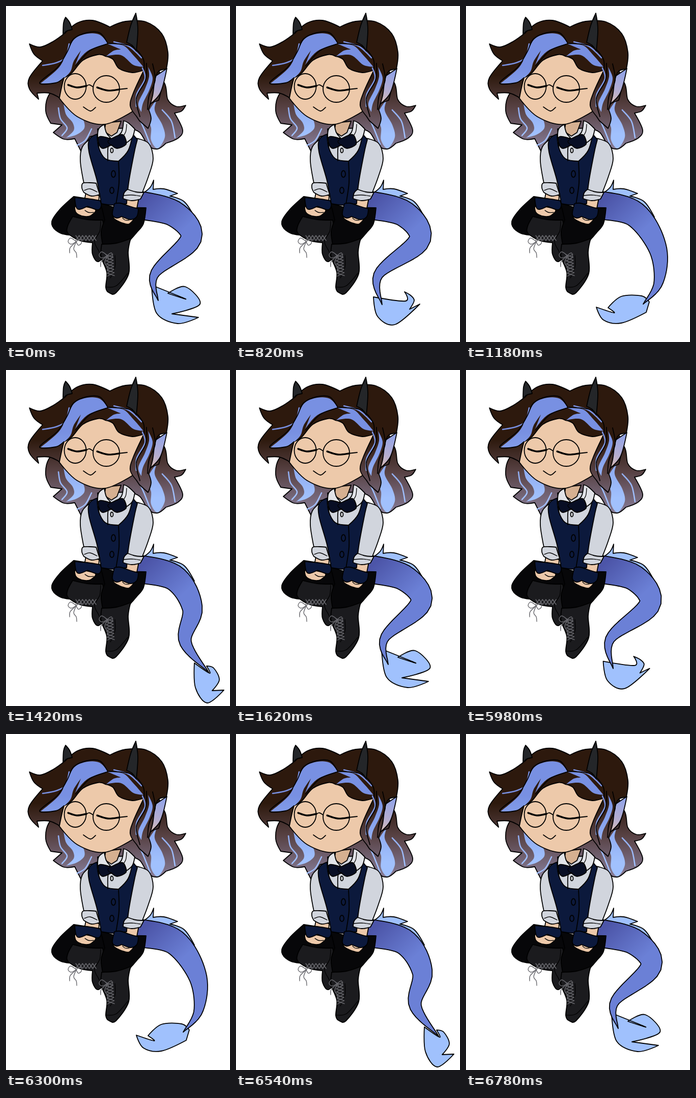
These frames come from a looping animation (440 px wide and 656 px high, 8000 ms). An HTML page:

```html
<!DOCTYPE html>
<html lang="en">
<head>
<meta charset="utf-8">
<title>Resting, with a tail flick</title>
<style>
html, body { margin: 0; width: 100%; height: 100%; overflow: hidden; background: #fff; }
svg { display: block; width: 100vw; height: 100vh; }
path { stroke: #000; stroke-width: 1.8; stroke-linejoin: round; stroke-linecap: round; }
.hair { fill: url(#hairFill); }
.streak { fill: url(#streakFill); stroke: none; }
.ear { fill: url(#earFill); }
.tail { fill: url(#tailFill); }
.fin { fill: #a0c1fd; }
.skin { fill: #edc9aa; }
.neck { fill: #d5b091; }
.shirt { fill: #d1d5dd; }
.collar { fill: #e1e3e7; }
.vest { fill: #0c193c; }
.bow { fill: #080e24; }
.pants { fill: #070709; }
.boot { fill: #1b1b1e; }
.horn { fill: #242629; }
.line, .thin, .lid, .strand, .seam, .lace { fill: none; }
.thin { stroke-width: 1.3; }
.lid { stroke-width: 3.4; }
.strand { stroke: url(#streakFill); stroke-width: 2.6; }
.seam { stroke: #000; stroke-width: 1.2; }
.lace { stroke: #68686d; stroke-width: 1.4; }
</style>
</head>
<body>
<svg id="stage" viewBox="0 0 440 656">
  <defs>
    <linearGradient id="hairFill" gradientUnits="userSpaceOnUse" x1="0" y1="135" x2="0" y2="275">
      <stop offset="0" stop-color="#2d190d"/><stop offset=".45" stop-color="#574143"/><stop offset="1" stop-color="#857a94"/>
    </linearGradient>
    <linearGradient id="streakFill" gradientUnits="userSpaceOnUse" x1="0" y1="120" x2="0" y2="250">
      <stop offset="0" stop-color="#7890e2"/><stop offset="1" stop-color="#a1c1fd"/>
    </linearGradient>
    <linearGradient id="tailFill" gradientUnits="userSpaceOnUse" x1="280" y1="370" x2="345" y2="440">
      <stop offset="0" stop-color="#4c55a8"/><stop offset="1" stop-color="#6b80d6"/>
    </linearGradient>
    <linearGradient id="earFill" gradientUnits="userSpaceOnUse" x1="314" y1="125" x2="284" y2="192">
      <stop offset="0" stop-color="#8fa3ea"/><stop offset=".6" stop-color="#b4add0"/><stop offset="1" stop-color="#dcbcb0"/>
    </linearGradient>
  </defs>
</svg>

<script>
const stage = document.getElementById("stage");
const OPEN = ["line", "thin", "lid", "strand", "seam", "lace"];

// Key points are written "x,y"; a trailing * marks a sharp corner.
const parse = text => text.split(" ").map(word => {
  const [x, y] = word.replace("*", "").split(",").map(Number);
  return { x, y, sharp: word.endsWith("*") };
});

// Smooth curve through key points: each handle follows the neighbours, corners have none.
function curve(points, closed) {
  const count = points.length;
  const at = i => points[closed ? (i + count) % count : Math.max(0, Math.min(count - 1, i))];
  const handle = (i, side) => {
    const reach = at(i).sharp ? 0 : side / 6;
    return [at(i).x + (at(i + 1).x - at(i - 1).x) * reach, at(i).y + (at(i + 1).y - at(i - 1).y) * reach];
  };
  let d = `M${points[0].x} ${points[0].y}`;
  for (let i = 0; i < (closed ? count : count - 1); i++) {
    d += `C${handle(i, 1)} ${handle(i + 1, -1)} ${at(i + 1).x},${at(i + 1).y}`;
  }
  return closed ? d + "Z" : d;
}

function addPath(kind, d = "") {
  const path = document.createElementNS("http://www.w3.org/2000/svg", "path");
  path.setAttribute("class", kind);
  path.setAttribute("d", d);
  return stage.appendChild(path);
}

function shape(kind, text, dx = 0, dy = 0) {
  const points = parse(text).map(p => ({ ...p, x: p.x + dx, y: p.y + dy }));
  addPath(kind, curve(points, !OPEN.includes(kind)));
}

function oval(kind, x, y, rx, ry = rx) {
  addPath(kind, `M${x - rx} ${y}a${rx} ${ry} 0 1 1 ${2 * rx} 0a${rx} ${ry} 0 1 1 ${-2 * rx} 0`);
}

function lacing(x, y, dx, dy, width, crossings) {
  const length = Math.hypot(dx, dy);
  for (const side of [1, -1]) {
    const zigzag = Array.from({ length: crossings + 1 }, (_, i) => {
      const swing = side * (i % 2 ? 1 : -1) * width / 2 / length, along = i / crossings;
      return `${x + dx * along - dy * swing},${y + dy * along + dx * swing}*`;
    });
    shape("lace", zigzag.join(" "));
  }
}

function shoeBow(x, y) {
  shape("lace", "0,0* -11,-7 -16,0 -10,5 0,0* 8,-5 10,3 4,7 0,0*", x, y);
  shape("lace", "0,0 -12,12 -13,22", x, y);
  shape("lace", "0,0 -5,14 0,22 1,31", x, y);
}

function drawBackHair() {
  shape("hair", "84,174 78,205 88,229* 110,232* 93,247* 114,260 135,259* 147,283* 165,255* 245,240* 263,247 280,273 298,279 314,268* 338,258 347,242 331,209* 345,205 353,194* 334,196 318,183 307,145 250,120* 110,150*");
  shape("streak", "113,190* 132,203 150,219 154,238 139,251 118,257* 133,243 131,228 118,212");
  shape("strand", "103,199 107,220 120,238 110,253");
  shape("strand", "140,272 156,262 168,240");
  shape("streak", "299,178* 292,203 307,232 312,256 298,278 285,262 285,238 278,212");
  shape("strand", "307,203 325,225 332,257");
  shape("strand", "263,222 272,242 283,270");
}

function drawLegs() {
  shape("pants", "133,372* 105,398 90,421 98,438 124,447 190,447* 212,400* 185,380*");
  shape("boot", "131,411* 121,430 122,444 145,458 170,462* 170,485 182,499 202,475* 190,418* 160,417");
  shape("seam", "186,420 184,440 174,460 183,480 187,496");
  shape("pants", "186,385* 213,393* 275,394* 270,425 257,442 243,458* 218,464 190,466* 187,440 194,418*");
  shape("boot", "188,465* 217,463 245,454* 240,480 241,523 216,560 203,560 196,550 198,520 187,490");
  shape("seam", "198,549 217,546 240,521");
  shape("seam", "214,487 214,510 205,531");
  lacing(137, 453, 40, 0, 10, 6);
  lacing(203, 485, 3, 42, 14, 7);
  shoeBow(138, 460);
  shoeBow(199, 487);
}

function drawTorso() {
  shape("skin", "157,364* 183,370* 182,382* 154,380*");
  shape("skin", "232,374* 261,374* 257,395* 229,390*");
  shape("shirt", "169,257* 150,275 146,303 154,351* 184,366* 190,300*");
  shape("shirt", "180,240* 250,238* 252,310* 185,315*");
  shape("shirt", "254,258* 280,268 289,298 280,332 267,366* 231,362* 240,305*");
  shape("vest", "179,250* 164,260 163,285 179,342 187,386* 212,389 237,386* 241,345 252,286 258,261* 249,250* 240,282 221,303* 195,298 182,276");
  shape("line", "221,303 222,345 216,387");
  shape("line", "203,262 200,280 200,302");
  oval("vest", 211, 328, 4, 6.5);
  oval("vest", 208, 360, 4, 6);
  oval("collar", 208, 282, 2.5, 4.5);
  shape("shirt", "151,346 149,355 153,364* 168,371 184,368* 177,346* 164,345");
  shape("thin", "154,360 165,357 179,363");
  shape("shirt", "239,358* 232,365 230,376* 247,380 264,377* 271,364* 255,363");
  shape("thin", "231,370 246,369 264,371");
}

function drawHands() {
  shape("skin", "139,390 136,400 142,407 155,411 167,409 175,397");
  shape("skin", "212,402 211,413 218,419 233,425 243,425 249,412");
  shape("vest", "135,374* 160,376 185,380* 187,390 181,398 160,391* 145,397 138,393");
  shape("vest", "213,386* 225,385 243,391 260,396* 257,411 245,417 227,411* 217,414 209,407");
  shape("thin", "155,399 162,403 172,403");
  shape("thin", "229,414 234,418 242,418");
}

function drawNeck() {
  shape("neck", "196,228* 226,225* 218,247* 207,254* 193,245*");
  shape("collar", "193,231* 182,240 180,256* 189,266* 205,257* 197,247");
  shape("collar", "231,224* 240,228 253,240* 248,257 235,268* 214,257* 227,246");
  shape("thin", "237,231 235,246 226,260");
  shape("bow", "205,259* 184,255 182,267 190,278 207,271* 218,278 235,271 235,260 228,251 209,258*");
  shape("seam", "205,259 200,265 205,271");
}

function drawHead() {
  shape("hair", "295,118* 307,145 300,184* 276,193* 270,115*");
  shape("ear", "316,122* 292,138* 287,170 280,194* 303,170");
  shape("skin", "109,138 104,179* 140,216 194,231 250,205* 272,160* 275,108* 200,70* 120,110*");
  shape("hair", "46,74* 68,80 93,69 117,52* 140,33 170,28 204,41* 235,30 275,31 306,54 318,90 315,123* 299,128 292,147 288,175 280,202* 285,220 279,239* 262,224* 256,215* 244,195 250,170 271,125* 248,130 222,122 210,104 195,98* 180,95 151,106 130,130 114,140* 110,155 105,179* 85,170 61,170* 64,182* 46,162 46,140 72,107* 55,94");

  shape("streak", "200,73* 184,56 160,54 135,64 120,90 104,120 68,151* 100,149 125,130 133,108 147,87* 136,115* 160,88");
  shape("strand", "124,74 117,100 98,111 72,116");
  shape("line", "200,73 185,53 160,52 133,64 120,90 101,120 66,150 98,150 114,140");
  shape("line", "199,74 165,87 137,117");
  shape("streak", "200,74* 230,77 250,96 270,119* 250,115 226,96 197,98* 212,87 226,85*");
  shape("strand", "212,70 242,79 266,101");
  shape("line", "202,73 245,78 269,102 271,125");
  shape("streak", "279,119* 288,140 282,163 269,190 266,207* 260,190 273,162 281,138");
  shape("strand", "268,121 273,142 257,172 256,196");
  shape("line", "276,112 274,145 256,180 263,216");
  shape("line", "288,113 293,145 281,175 278,202");

  shape("horn", "112,56* 113,33 117,22* 125,32 130,46* 119,49");
  shape("horn", "237,71* 245,38 255,14* 259,45 256,88* 248,77");

  oval("line", 136, 157, 21.5, 25);
  oval("line", 197, 162, 26);
  shape("line", "158,156 164,154 171,158");
  shape("lid", "122,154 139,159 158,156");
  shape("lid", "179,159 200,165 222,163");
  shape("line", "220,163 238,161");
  shape("line", "152,197 166,205 176,198");
}

// Tail spine below its fixed root, and the tuft outline (corner points marked).
const poses = [
  { spine: "363,455 292,523 299,575", // hooked right
    tuft: "286,545* 296,600 337,620 378,608* 326,601* 381,582 352,548 318,561* 353,572" },
  { spine: "360,458 280,524 287,583", // pulled left
    tuft: "270,568* 278,606 312,622 361,582* 341,592* 350,575 343,565 331,558* 333,576" },
  { spine: "376,472 378,540 348,582", // bowed out
    tuft: "256,588* 270,613 305,619 354,598* 360,578* 345,566 305,567 279,589* 291,599" },
  { spine: "366,465 352,530 398,590", // flicked right
    tuft: "370,572* 372,620 395,650 428,625* 405,626* 419,605 408,582 394,578* 400,592" }
].map(pose => ({ spine: parse("258,388 331,406 " + pose.spine), tuft: parse(pose.tuft) }));

const mixPoints = (from, to, mix) => from.map((p, i) => ({
  x: p.x + (to[i].x - p.x) * mix, y: p.y + (to[i].y - p.y) * mix, sharp: p.sharp
}));

const guide = document.createElementNS("http://www.w3.org/2000/svg", "path");

// A ribbon around the spine whose half width shrinks to a point.
function ribbon(spine) {
  guide.setAttribute("d", curve(spine, false));
  const length = guide.getTotalLength(), samples = 36, upper = [], lower = [];
  for (let i = 0; i <= samples; i++) {
    const along = i / samples;
    const p = guide.getPointAtLength(length * along);
    const before = guide.getPointAtLength(length * along - 1), after = guide.getPointAtLength(length * along + 1);
    const angle = Math.atan2(after.y - before.y, after.x - before.x);
    const half = 27 * (1 - along ** 1.9);
    const nx = Math.sin(angle) * half, ny = -Math.cos(angle) * half;
    upper.push(`${p.x + nx} ${p.y + ny}`);
    lower.unshift(`${p.x - nx} ${p.y - ny}`);
  }
  return `M${upper.concat(lower).join("L")}Z`;
}

drawBackHair();
shape("fin", "273,363* 284,353 290,340* 289,358* 310,357 337,366* 322,371* 350,382 370,412* 330,395* 280,370*");
const tuft = addPath("fin"), tail = addPath("tail");
drawLegs();
drawTorso();
drawHands();
drawNeck();
drawHead();

const LOOP = 8000, STEP = 40, FLICKS = [500, 5620];
const KEYS = [[0, 0], [320, 1], [680, 2], [800, 2.5], [920, 3], [1120, 4]]; // [ms into the flick, pose]

function poseAt(time) {
  const begin = time < FLICKS[1] ? FLICKS[0] : FLICKS[1];
  const elapsed = Math.floor((time - begin) / STEP) * STEP;
  const next = KEYS.findIndex(([at]) => at > elapsed);
  if (next < 1) return 0;
  const [[t0, from], [t1, to]] = [KEYS[next - 1], KEYS[next]];
  const u = (elapsed - t0) / (t1 - t0);
  return from + (to - from) * u * u * (3 - 2 * u);
}

const start = performance.now();
function draw() {
  const position = poseAt((performance.now() - start) % LOOP);
  const index = Math.floor(position);
  const from = poses[index], to = poses[(index + 1) % poses.length];
  tail.setAttribute("d", ribbon(mixPoints(from.spine, to.spine, position - index)));
  tuft.setAttribute("d", curve(mixPoints(from.tuft, to.tuft, position - index), true));
  requestAnimationFrame(draw);
}
draw();
</script>
</body>
</html>
```
